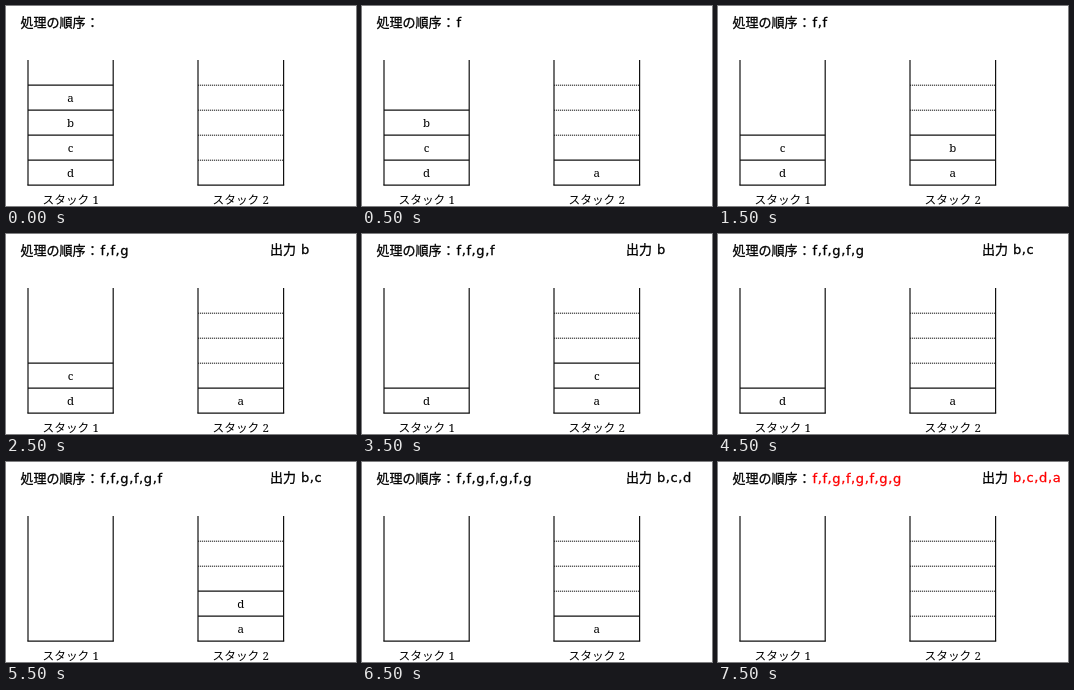
An HTML page for the animation above (8000 ms loop, 350 px wide and 200 px high).

```html
<!DOCTYPE html>
<html lang="ja">
<head>
<meta charset="utf-8">
<style>
  html, body { margin: 0; height: 100%; overflow: hidden; background: #fff; }
  svg { display: block; }
  line { stroke: #111; stroke-width: 1.2; }
  .slot { stroke-width: 1; stroke-dasharray: 1.2 .8; }
  .head, .list { stroke-width: .3px; }
  .head { font: 500 13px "Noto Sans CJK JP", "Noto Sans CJK", sans-serif; }
  .list { font: 13px "DejaVu Sans", sans-serif; letter-spacing: .6px; }
  .item { font: 11.5px "Noto Serif", serif; text-anchor: middle; }
  .name { font: 11.7px "Noto Sans CJK JP", "Noto Sans CJK", sans-serif; }
  .digit { font: 11.5px "Noto Serif", serif; }
</style>
</head>
<body>
<svg width="350" height="200" viewBox="0 0 350 200"></svg>
<script>
const LOOP = 8000, STEP = 1000, OPS = [..."ffgfgfgg"];
const TOP = 54, BOTTOM = 179.2, CELL = 25;
const svg = document.querySelector("svg");

const text = (cls, x, y, str, color = "#000") =>
  `<text class="${cls}" x="${x}" y="${y}" fill="${color}" stroke="${color}" ` +
  `${cls === "head" || cls === "list" ? "" : 'stroke-width="0"'}>${str}</text>`;
const line = (x1, y1, x2, y2, cls = "") =>
  `<line class="${cls}" x1="${x1}" y1="${y1}" x2="${x2}" y2="${y2}"/>`;

// Items are listed from the bottom up; unused slots may be dotted.
function stack(left, right, number, items, showSlots) {
  let out = line(left, TOP, left, BOTTOM) + line(right, TOP, right, BOTTOM) +
    line(left - .6, BOTTOM, right + .6, BOTTOM);
  for (let i = 0; i < 4; i++) {
    const y = BOTTOM - CELL * (i + 1);
    if (items[i]) out += line(left, y, right, y) + text("item", (left + right) / 2, y + 16.5, items[i]);
    else if (showSlots) out += line(left, y, right, y, "slot");
  }
  return out + text("name", left + 14.5, 198, "スタック") + text("digit", left + 64.5, 198, number);
}

// f moves the top item to stack 2, g takes it from there to the output.
function render(step) {
  const first = [..."dcba"], second = [], output = [];
  const done = OPS.slice(0, step);
  for (const op of done) {
    if (op === "f") second.push(first.pop());
    else output.push(second.pop());
  }
  const color = step === OPS.length ? "#f00" : "#000";
  svg.innerHTML =
    text("head", 14.5, 21, "処理の順序") + text("head", 80, 21, "：") +
    text("list", 94.5, 21, done.join(), color) +
    (output.length ? text("head", 264, 20, "出力") + text("list", 295, 20, output.join(), color) : "") +
    stack(22, 107.2, 1, first, false) + stack(192, 277.6, 2, second, true);
}

let shown = -1;
function tick() {
  const step = Math.floor((performance.now() % LOOP + STEP / 2) / STEP);
  if (step !== shown) render(shown = step);
  requestAnimationFrame(tick);
}
tick();
</script>
</body>
</html>
```
